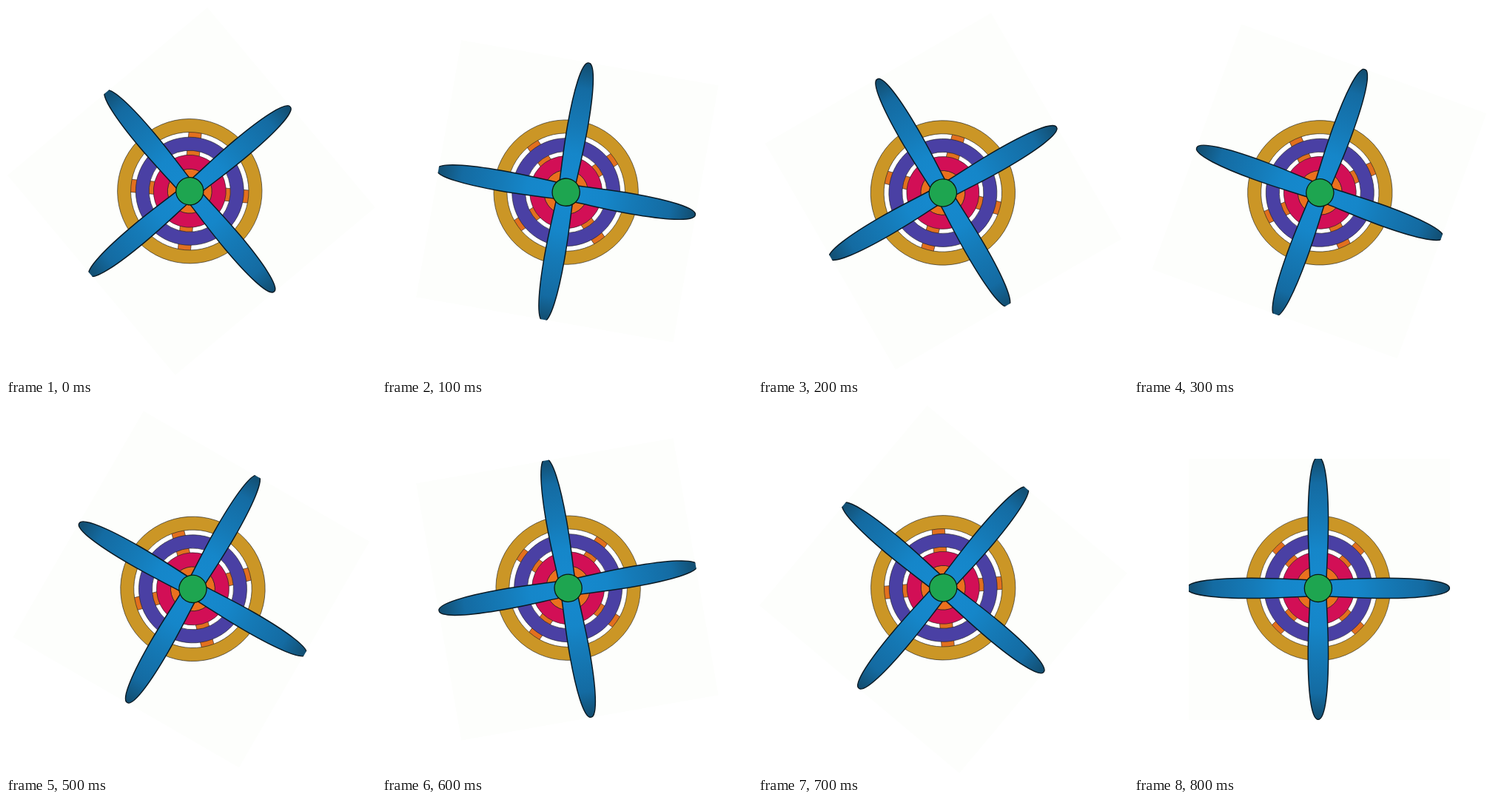
Animation, 500 px wide and 500 px high, one loop 900 ms. Source, as an HTML page:

```html
<!DOCTYPE html>
<html lang="en">
<head>
<meta charset="utf-8">
<title>Propeller</title>
<style>
  html, body { margin: 0; width: 100%; height: 100%; overflow: hidden; background: #fff; }
  svg { display: block; width: 100%; height: 100%; }
</style>
</head>
<body>
<svg viewBox="0 0 500 500">
  <defs>
    <radialGradient id="steel" gradientUnits="userSpaceOnUse" cx="0" cy="0" r="178">
      <stop offset="0" stop-color="#168acf"/>
      <stop offset=".3" stop-color="#1586c9"/>
      <stop offset=".5" stop-color="#157ab7"/>
      <stop offset=".8" stop-color="#146ba2"/>
      <stop offset="1" stop-color="#124b6c"/>
    </radialGradient>
    <clipPath id="card"><rect x="-176.5" y="-176.5" width="353" height="353"/></clipPath>
    <path id="blade" d="M-11.2 -14 C-12 -38 -13.7 -58 -13.7 -90 C-13.7 -135 -10 -177.5 0 -177.5 C10 -177.5 13.7 -135 13.7 -90 C13.7 -58 12 -38 11.2 -14 Z"/>
    <rect id="spoke" x="-8.6" y="-85" width="17.2" height="170"/>
  </defs>
  <g id="rotor" clip-path="url(#card)">
    <rect x="-176.5" y="-176.5" width="353" height="353" fill="#fdfefc"/>
    <g transform="translate(-1.5 -1.5)" stroke="#222" stroke-width=".6">
      <circle r="79.7" fill="#fff" stroke="none"/>
      <g fill="#e2701f">
        <use href="#spoke" transform="rotate(45.3)"/>
        <use href="#spoke" transform="rotate(-44.7)"/>
      </g>
      <circle r="30" fill="#ea701e"/>
      <g id="rings"></g>
      <g id="blades" fill="url(#steel)" stroke="#0b1a24" stroke-width="1.5"></g>
      <circle r="18.6" fill="#1ea550" stroke="#0b1a10" stroke-width="1.3"/>
    </g>
  </g>
</svg>
<script>
  const STEP_MS = 100, STEPS = 9, TURN = 360 / STEPS;
  const $ = id => document.getElementById(id);

  const disc = r => `M${-r} 0 a${r} ${r} 0 1 0 ${2 * r} 0 a${r} ${r} 0 1 0 ${-2 * r} 0 Z`;
  const ring = ([outer, inner, fill]) =>
    `<path d="${disc(outer)} ${disc(inner)}" fill="${fill}" fill-rule="evenodd"/>`;

  $('rings').innerHTML = [
    [97.7, 79.7, '#cb9626'],
    [73, 55, '#4a40a4'],
    [49, 30, '#d20f56']
  ].map(ring).join('');

  $('blades').innerHTML = [0, 90, 180, 270]
    .map(a => `<use href="#blade" transform="rotate(${a})"/>`).join('');

  // The rotor jumps counter-clockwise once per step.
  function draw(ms) {
    const step = Math.floor(ms / STEP_MS) % STEPS;
    $('rotor').setAttribute('transform', `translate(250.4 250.4) rotate(${-TURN * (step + 1)})`);
  }

  const start = performance.now();
  function tick() {
    draw(performance.now() - start);
    requestAnimationFrame(tick);
  }
  tick();
</script>
</body>
</html>
```
